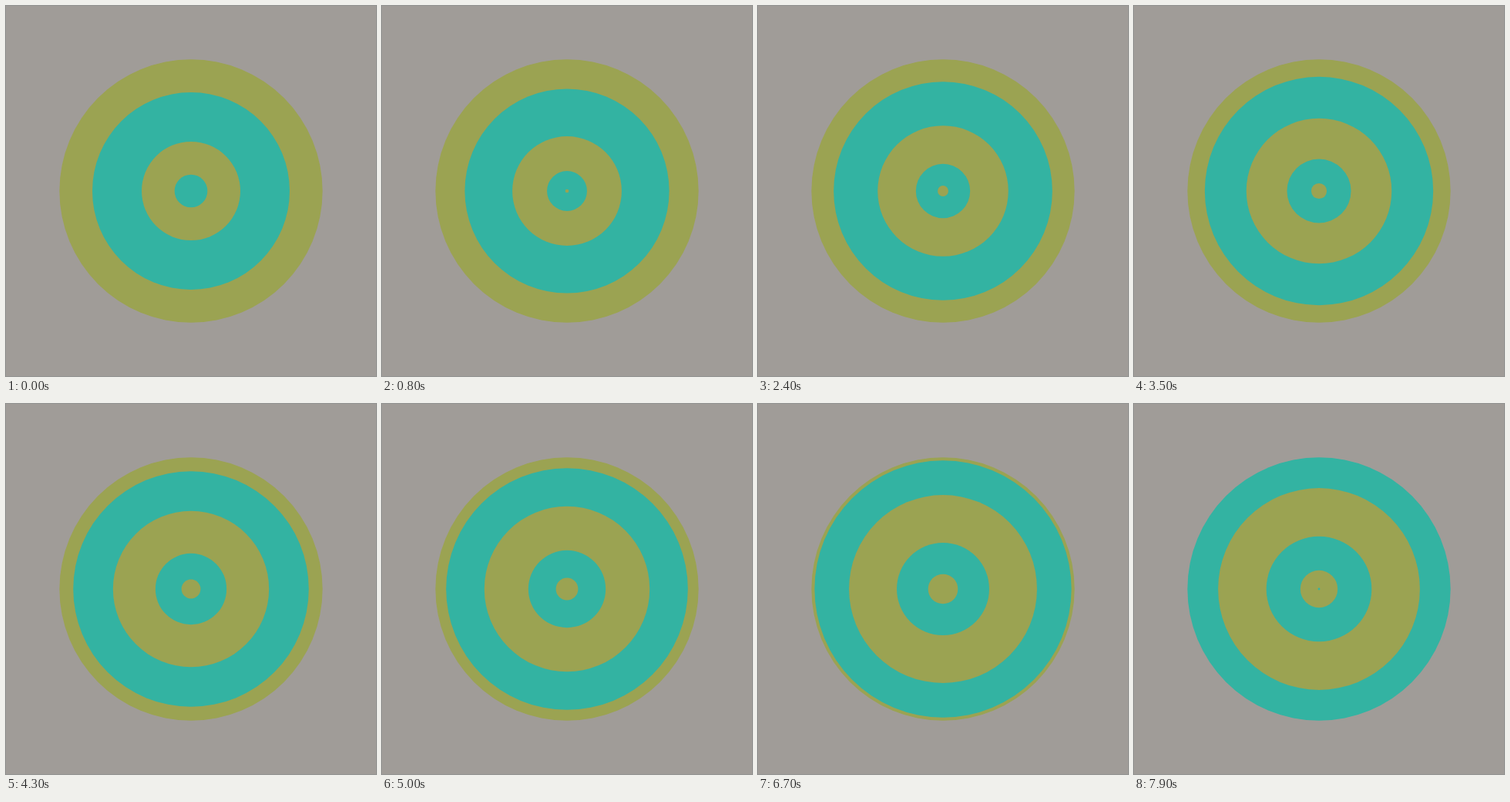
Write an HTML page that moves like this. It is 480x480 px and loops after 8 s.

```html
<!DOCTYPE html>
<html lang="en">
<head>
<meta charset="utf-8">
<title>Growing rings</title>
<style>
  html, body { margin: 0; width: 100%; height: 100%; overflow: hidden; background: #a09c98; }
  svg { display: block; width: 100vw; height: 100vh; }
</style>
</head>
<body>
<svg viewBox="0 0 480 480"></svg>
<script>
  const LOOP = 8000;
  const STEP = 100;
  const STAGE = 7400; // time a ring takes to reach the next radius
  const COLORS = ['#9ba352', '#33b3a2'];
  const RADII = [0, 1, 3, 6, 8].map(n => n * 64 / 3);

  const svg = document.querySelector('svg');

  // Largest first: a fixed outer disc, then the growing rings.
  const discs = RADII.map(() => {
    const disc = document.createElementNS('http://www.w3.org/2000/svg', 'circle');
    disc.setAttribute('cx', 240);
    disc.setAttribute('cy', 240);
    svg.append(disc);
    return disc;
  });

  function draw(time) {
    const stage = Math.floor(time / STAGE);
    const part = time / STAGE - stage;
    const last = RADII.length - 1;
    discs.forEach((disc, i) => {
      const from = RADII[last - i];
      const to = RADII[Math.min(last - i + 1, last)];
      disc.setAttribute('r', from + (to - from) * part);
      disc.setAttribute('fill', COLORS[(i + stage) % 2]);
    });
  }

  const start = performance.now();

  function tick() {
    const time = (performance.now() - start) % LOOP;
    draw(Math.floor(time / STEP) * STEP);
    requestAnimationFrame(tick);
  }

  tick();
</script>
</body>
</html>
```
